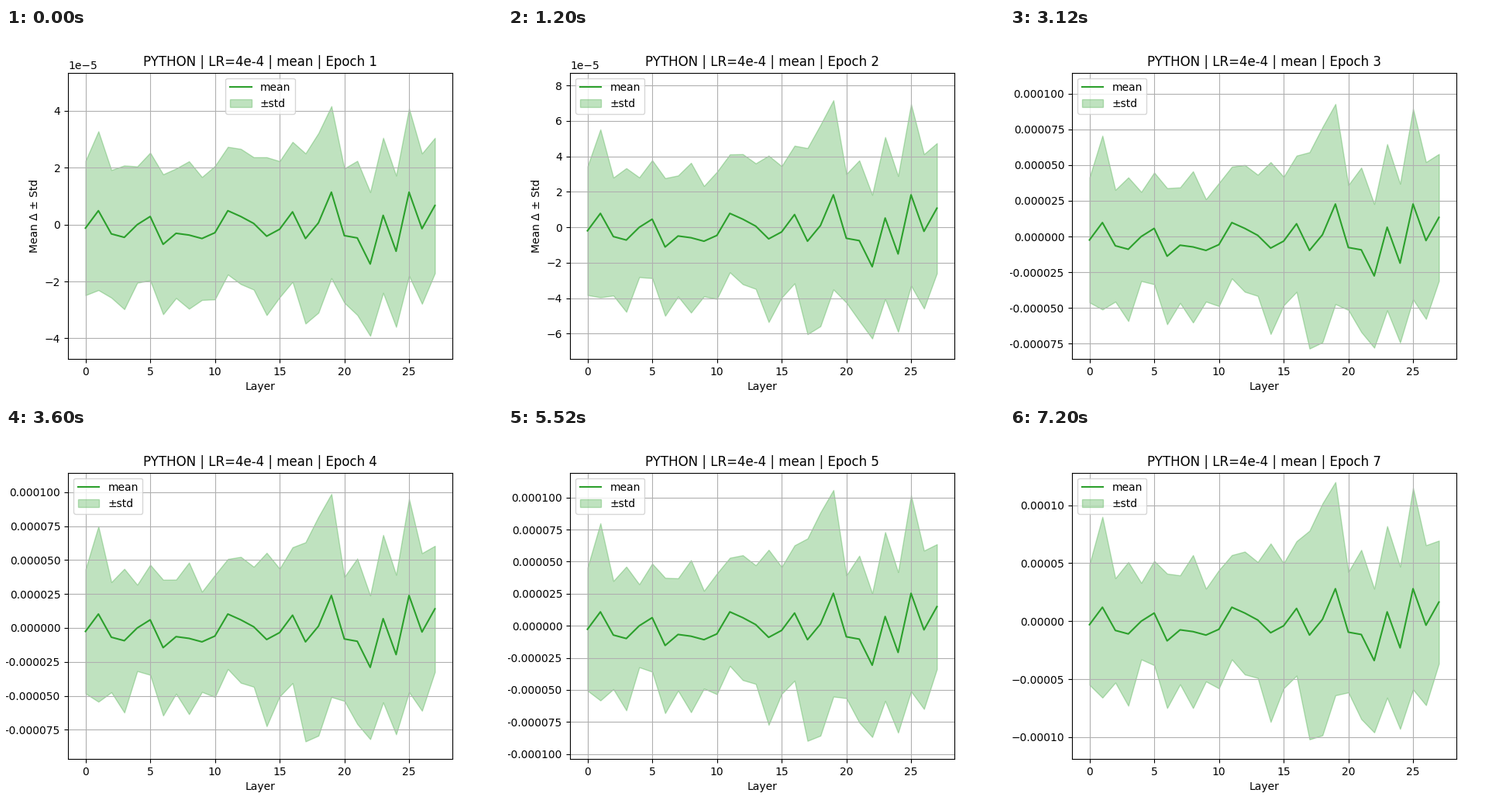
Recreate the animation shown at these times as a matplotlib script. Size 640 px wide and 480 px high, loop 8000 ms.

```python
import numpy as np
import matplotlib.pyplot as plt
from matplotlib.animation import FuncAnimation

STEP_MS = 400
STEPS_PER_EPOCH = 3
N_STEPS = 20
UNIT = 1e-6
MARGIN = 0.05
GREEN = "tab:green"

# Settled shape of the curve and of its spread, one value per layer.
MEAN = np.array([-3, 12, -8, -11, 0, 7, -17, -7.5, -9, -12, -7, 12, 7, 1,
                 -10, -4, 11, -12, 1.5, 28, -9.5, -11.5, -34, 8, -23, 28,
                 -3.5, 16.5])
STD = np.array([52, 78, 45, 62, 33, 45, 58, 47, 66, 40, 51, 45, 53, 50,
                77, 54, 58, 90, 100, 92, 52, 73, 62, 74, 70, 87, 69, 53])
LAYERS = np.arange(len(MEAN))

# Lowest and highest value reached in each epoch.
EXTENTS = [(-42.7, 48.85), (-67, 79.9), (-76.7, 105.6), (-87, 104.8),
           (-93.75, 109.2), (-98.3, 114.8), (-107.75, 116.9)]


def span(epoch):
    low, high = EXTENTS[epoch]
    return high - low


def curves(epoch):
    """Scale both profiles with the span; early spreads are more even."""
    gain = span(epoch) / span(-1)
    level = STD.mean()
    std = level + gain * (STD - level)
    return gain * MEAN * UNIT, gain * std * UNIT


fig, ax = plt.subplots(figsize=(6.4, 4.8), dpi=100)


def draw(step):
    epoch = step // STEPS_PER_EPOCH
    mean, std = curves(epoch)
    low, high = EXTENTS[epoch]
    pad = MARGIN * span(epoch)
    ax.clear()
    ax.plot(LAYERS, mean, color=GREEN, label="mean")
    ax.fill_between(LAYERS, mean - std, mean + std,
                    color=GREEN, alpha=0.3, label="±std")
    ax.set_ylim((low - pad) * UNIT, (high + pad) * UNIT)
    ax.set_title(f"PYTHON | LR=4e-4 | mean | Epoch {epoch + 1}")
    ax.set_xlabel("Layer")
    ax.set_ylabel("Mean Δ ± Std")
    ax.grid(True)
    ax.legend(loc="upper center" if epoch == 0 else "upper left")


anim = FuncAnimation(fig, draw, frames=N_STEPS, init_func=lambda: None,
                     interval=STEP_MS, repeat=True, repeat_delay=0)
plt.show()
```
